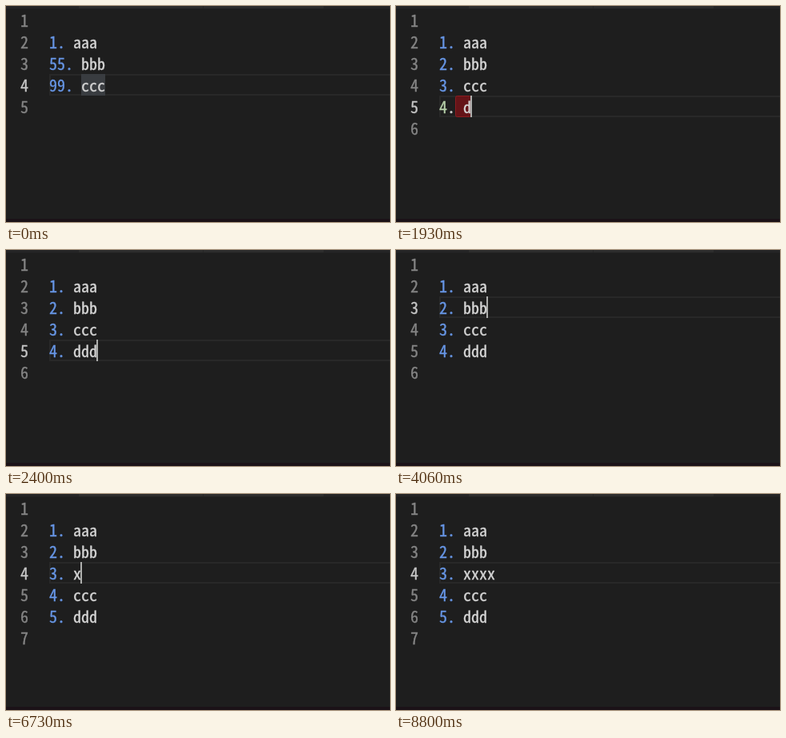
Animation, 480 px wide and 270 px high, one loop 9260 ms. Source, as an HTML page:

```html
<!DOCTYPE html>
<html lang="en">
<head>
<meta charset="utf-8">
<title>Ordered list editing</title>
<style>
html, body { margin: 0; width: 100%; height: 100%; overflow: hidden; background: #1e1e1e; }
svg { display: block; width: 480px; height: 270px; }
text { font-family: "Noto Sans Mono CJK JP", "Noto Sans Mono CJK SC", "Noto Sans Mono", monospace; white-space: pre; stroke-width: .35px; }
</style>
</head>
<body>
<svg id="stage" viewBox="0 0 480 270"></svg>
<script>
const LOOP = 9260, ROW = 27, TOP = 4, LEFT = 54, CHAR = 10;
const stage = document.getElementById("stage");

// Font size that gives a 10px character cell
const pen = document.createElement("canvas").getContext("2d");
pen.font = '100px "Noto Sans Mono CJK JP", "Noto Sans Mono CJK SC", "Noto Sans Mono", monospace';
const SIZE = 100 * CHAR / pen.measureText("a").width;

const start = ["1. aaa", "55. bbb", "99. ccc"];
const list = (...words) => words.map((w, i) => `${i + 1}. ${w}`);
const four = list("aaa", "bbb", "ccc", "ddd");
const grow = word => list("aaa", "bbb", word, "ccc", "ddd");
const add = word => list("aaa", "bbb", "ccc", word);

// at: time, items: list text, line: caret line; the caret sits at the line end
const steps = [
  { at: 0, items: start, line: 4, off: true, mark: true },
  { at: 330, items: start, line: 4, mark: true },
  { at: 860, items: start, line: 4, off: true, mark: true },
  { at: 1330, items: add(""), line: 5, raw: 1 },
  { at: 1800, items: add(""), line: 5, raw: 1, off: true },
  { at: 1930, items: add("d"), line: 5, raw: 2 },
  { at: 2000, items: add("d"), line: 5, menu: ["danger", "doc", "download"] },
  { at: 2200, items: add("dd"), line: 5, menu: ["download"] },
  { at: 2400, items: four, line: 5 },
  { at: 2930, items: four, line: 5, off: true },
  { at: 3400, items: four, line: 5 },
  { at: 3860, items: four, line: 4 },
  { at: 4060, items: four, line: 3 },
  { at: 4330, items: four, line: 3, mark: true },
  { at: 4600, items: four, line: 3, mark: true, off: true },
  { at: 5130, items: grow(""), line: 4, raw: 1 },
  { at: 5600, items: grow(""), line: 4, raw: 1, off: true },
  { at: 6130, items: grow(""), line: 4, raw: 1 },
  { at: 6600, items: grow(""), line: 4, raw: 1, off: true },
  { at: 6730, items: grow("x"), line: 4 },
  { at: 6860, items: grow("xx"), line: 4 },
  { at: 7060, items: grow("xxx"), line: 4 },
  { at: 7260, items: grow("xxxx"), line: 4 },
  { at: 7730, items: grow("xxxx"), line: 4, off: true },
  { at: 8260, items: grow("xxxx"), line: 4 },
  { at: 8800, items: grow("xxxx"), line: 4, off: true }
];

const rect = (x, y, w, h, fill, more = "") =>
  `<rect x="${x}" y="${y}" width="${w}" height="${h}" fill="${fill}" ${more}/>`;
const text = (x, y, s, fill, size = SIZE, more = "") =>
  `<text x="${x}" y="${y}" font-size="${size}" fill="${fill}" stroke="${fill}" ${more}>${s}</text>`;
const rowTop = n => TOP + (n - 1) * ROW;

function frame() {
  return rect(0, 0, 480, 270, "#1e1e1e") +
    rect(0, 0, 480, 3, "#252526") + rect(91, 0, 306, 3, "#2d2d2d") +
    rect(246, 0, 1, 3, "#252526") + rect(0, 3, 480, 1, "#222222") +
    rect(0, 266, 480, 4, "#1b1217");
}

function item(s, n, raw) {
  const y = rowTop(n) + 22, dot = s.indexOf(".");
  const word = text(LEFT + (dot + 2) * CHAR, y, s.slice(dot + 2), "#d4d4d4");
  if (!raw) return text(LEFT, y, s.slice(0, dot + 1), "#6796e6") + word;
  return text(LEFT, y, s.slice(0, dot), "#b5cea8") +
    text(LEFT + dot * CHAR, y, ".", "#d4d4d4") + word;
}

function menu(words, x) {
  const y = rowTop(6), small = SIZE * .85;
  let out = rect(x + .5, y + .5, 500, words.length * ROW + 2, "#252526", 'stroke="#454545"');
  words.forEach((w, i) => {
    const top = y + 1 + i * ROW, base = top + 22, ink = i ? "#d4d4d4" : "#ffffff";
    if (!i) out += rect(x + 1, top, 500, ROW, "#04466f");
    out += `<path d="M${x + 6} ${top + 20}V${top + 8}H${x + 17}V${top + 20}" fill="none" stroke="${ink}" stroke-width="1.3"/>` +
      `<path d="M${x + 6} ${top + 20}H${x + 18}" stroke="${ink}" stroke-width="1.3" stroke-dasharray="2 1.3"/>`;
    [...w].forEach((c, k) => {
      out += text(x + 23 + k * CHAR, base, c, c === "d" && (k === 0 || words.length === 1) ? "#18a3ff" : ink,
        SIZE, c === "d" && (k === 0 || words.length === 1) ? 'font-weight="700"' : "");
    });
    out += text(x + 421 - w.length * 8.5, base - 1, w, i ? "#8c8c8c" : "#9db4c4", small);
  });
  return out;
}

function scene(s) {
  const current = s.items[s.line - 2], y = rowTop(s.line);
  const end = LEFT + current.length * CHAR;
  let out = frame() + rect(LEFT + 1, y + 1, 440, ROW - 2, "none", 'stroke="#282828" stroke-width="2"');
  if (s.mark) out += rect(end - 3 * CHAR, y, 3 * CHAR, ROW, "#393c40");
  if (s.raw) out += rect(74.5, y + .5, s.raw * CHAR - 1, ROW - 1, "#651418", 'rx="2" stroke="#8c1c20"');
  for (let n = 1; n <= s.items.length + 2; n++)
    out += text(18, rowTop(n) + 22, n, n === s.line ? "#c6c6c6" : "#858585");
  s.items.forEach((t, i) => out += item(t, i + 2, s.raw && i + 2 === s.line));
  if (s.menu) out += menu(s.menu, end);
  if (!s.off) out += rect(end - 1, y, 2, ROW, "#aeafad");
  return out;
}

let shown;
function draw(now) {
  const t = now % LOOP;
  const step = steps.findLast(s => s.at <= t);
  if (step !== shown) stage.innerHTML = scene(shown = step);
}

let origin;
function tick(now) {
  origin ??= now;
  draw(now - origin);
  requestAnimationFrame(tick);
}
draw(0);
requestAnimationFrame(tick);
</script>
</body>
</html>
```
